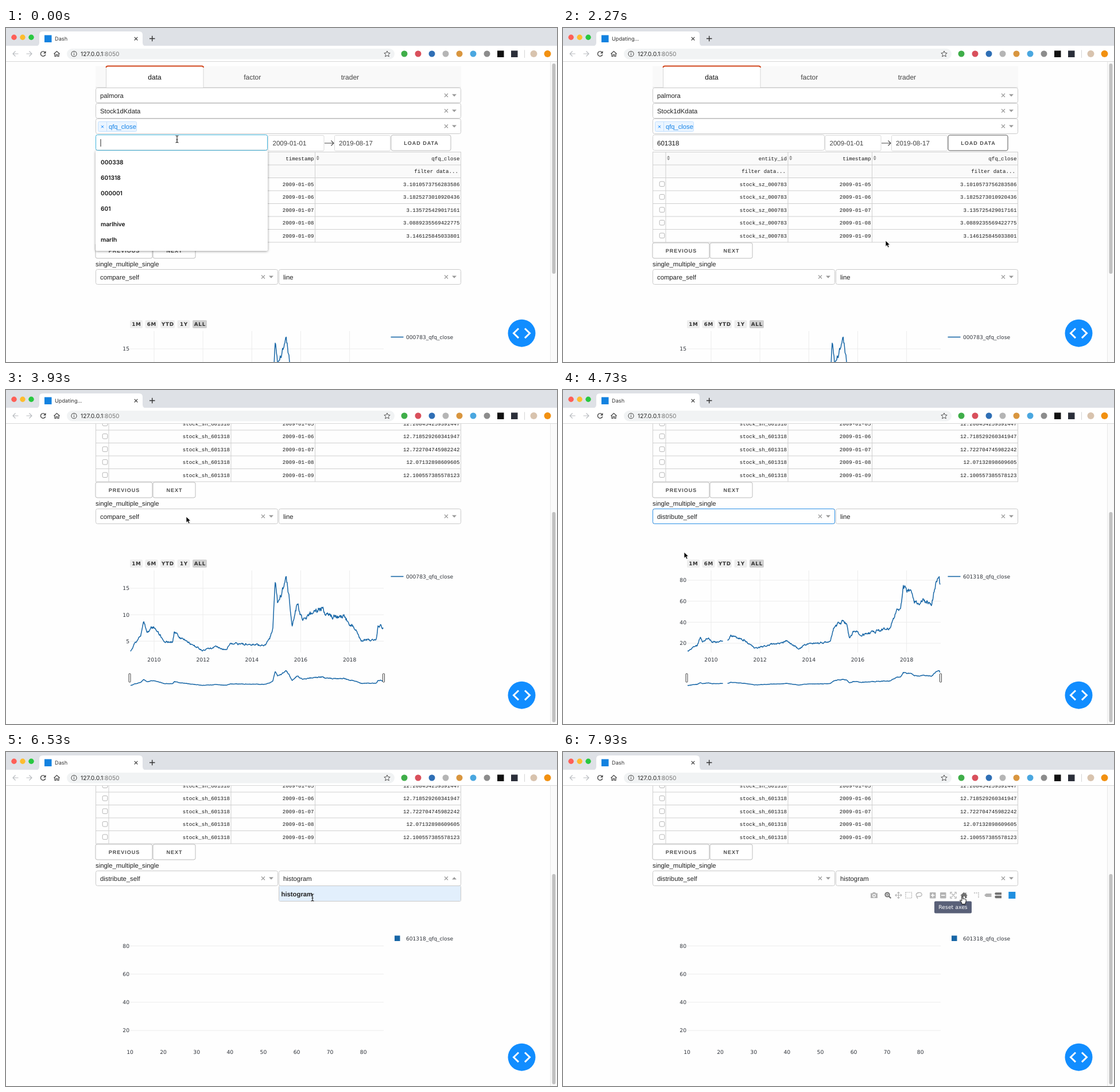
Write an HTML page that moves like this. It is 960 by 583 pixels and loops after 8000 ms.

```html
<!DOCTYPE html>
<html lang="en">
<head>
<meta charset="utf-8">
<title>Data dashboard</title>
<style>
html, body { margin: 0; width: 100%; height: 100%; overflow: hidden; background: #fff }
svg { display: block; width: 960px; height: 583px; text-rendering: geometricPrecision }
text { white-space: pre }
</style>
</head>
<body>
<svg id="stage" viewBox="0 0 960 583"></svg>
<script>
const LOOP = 8000, SCROLL = 214;
const SANS = '"Liberation Sans", Arial, sans-serif';
const MONO = '"Liberation Mono", monospace';
const PLOT = '"DejaVu Sans", Verdana, sans-serif';
const UI = 'Inter, sans-serif';
const BLUE = '#1766a6', GREY = '#b3b3b3', DARK = '#707070', BORDER = '#c9c9c9', GRID = '#ececec';
const timed = [];

// Drawing helpers
function el(parent, tag, attrs = {}, content) {
  const node = document.createElementNS('http://www.w3.org/2000/svg', tag);
  for (const k in attrs) node.setAttribute(k, attrs[k]);
  if (content !== undefined) node.textContent = content;
  return parent.appendChild(node);
}
const group = (p, attrs) => el(p, 'g', attrs);
const rect = (p, x, y, width, height, fill, attrs) => el(p, 'rect', { x, y, width, height, fill, ...attrs });
const box = (p, x, y, w, h, stroke, fill = '#fff', rx = 3) => rect(p, x, y, w, h, fill, { stroke, rx });
const line = (p, d, stroke, width = 1, attrs) =>
  el(p, 'path', { d, stroke, fill: 'none', 'stroke-width': width, ...attrs });
const shape = (p, d, fill, attrs) => el(p, 'path', { d, fill, ...attrs });
const dot = (p, cx, cy, r, fill, attrs) => el(p, 'circle', { cx, cy, r, fill, ...attrs });
// y is the middle of the capitals
const text = (p, x, y, s, size = 11.3, fill = '#222', attrs) =>
  el(p, 'text', { x, y: y + size * .36, 'font-family': SANS, 'font-size': size, fill, ...attrs }, s);
const cross = (p, x, y, r, stroke, w) =>
  line(p, `M${x - r} ${y - r}l${2 * r} ${2 * r}m0 ${-2 * r}l${-2 * r} ${2 * r}`, stroke, w);

// Shows a node only within the given [from, to] spans
function when(node, ...spans) {
  timed.push({ node, spans });
  return node;
}

// Moves smoothly through [time, value, ...] keys
function track(keys, t) {
  let a = keys[0];
  for (const b of keys) {
    if (t < b[0]) {
      const u = (t - a[0]) / (b[0] - a[0]), e = u * u * (3 - 2 * u);
      return a.slice(1).map((v, i) => v + (b[i + 1] - v) * e);
    }
    a = b;
  }
  return a.slice(1);
}

const svg = document.getElementById('stage');
rect(svg, 0, 0, 960, 583, '#fefefe');
const page = group(svg);

// Tabs
rect(page, 156, 66.5, 637, 37.5, '#f9f9f9');
line(page, 'M156 103.5H792.5', '#e3e3e3');
rect(page, 174, 66, 170, 38, '#fff');
line(page, 'M174.5 104V69q0-3 3-3H341q3 0 3 3V104', '#d6d6d6');
line(page, 'M174.5 69q0-2.5 3-2.5H341q3 0 3 2.5', '#d4491f', 2);
['data', 'factor', 'trader'].forEach((s, i) =>
  text(page, 259 + i * 170.2, 86, s, 12, i ? '#444' : '#111', { 'text-anchor': 'middle' }));

// Select boxes
function select(x, y, w) {
  box(page, x + .5, y + .5, w - 1, 26, BORDER);
  cross(page, x + w - 26, y + 13.5, 3, '#999', 1.1);
  shape(page, `M${x + w - 16} ${y + 11.5}h8l-4 4.2z`, '#999');
  return { x, y, w };
}
const focusRing = (s, span) => when(box(page, s.x + .5, s.y + .5, s.w - 1, 26, '#2a8fe6', 'none'), span);
const selected = (s, label, span) => when(text(page, s.x + 8, s.y + 13.5, label), span);
const always = [0, LOOP];
const [source, kind] = [104, 131, 158].map(y => select(156, y, 637));
selected(source, 'palmora', always);
selected(kind, 'Stock1dKdata', always);
box(page, 160.5, 163.5, 67, 17, '#c2e0ff', '#ebf5ff', 2);
line(page, 'M175.5 163V181', '#c2e0ff');
cross(page, 168, 172.3, 2, '#007eff', 1);
text(page, 179, 172, 'qfq_close', 11.2, '#1583e8');

// Code input, dates, load button
box(page, 156.5, 186.5, 299, 27, '#d1d1d1');
when(box(page, 156.5, 186.5, 299, 27, '#3fb4dd'), [0, 1600]);
when(line(page, 'M165 194V207', '#222'), [0, 600]);
when(text(page, 164, 200.5, '601318', 11.5, '#111'), [600, LOOP]);
['2009-01-01', '2019-08-17'].forEach((s, i) => {
  const x = 457 + i * 115.5;
  box(page, x, 187.5, 97, 27, '#dbdbdb', '#fff', 2);
  text(page, x + 7.5, 201, s, 11.5, '#444');
});
line(page, 'M555 201H571M566.5 196.5l4.5 4.5-4.5 4.5', '#484848', 1.1);
function button(x, y, w, s) {
  box(page, x + .5, y + .5, w - 1, 27, '#bbb');
  text(page, x + w / 2 + .5, y + 14, s, 9, '#4c4c4c',
    { 'font-weight': 700, 'letter-spacing': 1, 'text-anchor': 'middle' });
}
button(670.5, 186.5, 105, 'LOAD DATA');
when(box(page, 671, 187, 104, 27, '#777', 'none'), [1450, LOOP]);

// Table
const columns = [156.5, 179, 392, 538.5, 792.5];
const mono = (p, x, y, s) => text(p, x, y, s, 9.13, '#1a1a1a', { 'font-family': MONO, 'text-anchor': 'end' });
rect(page, 156, 216.5, 636, 45, '#fafafa');
for (let i = 0; i < 8; i++) line(page, `M156 ${216.5 + i * 22.5}H793`, '#cfcfcf');
columns.forEach(x => line(page, `M${x} 216V374`, '#cfcfcf'));
['entity_id', 'timestamp', 'qfq_close'].forEach((s, i) => {
  mono(page, columns[i + 2] - 2, 227.5, s);
  shape(page, `M${columns[i + 1] + 2} 226.2h5.4l-2.7-3.4zm0 1.4h5.4l-2.7 3.4z`, '#999');
});
[388, 788].forEach(x => mono(page, x, 250, 'filter data...'));
function tableRows(code, values, span) {
  const g = when(group(page), span);
  values.forEach((v, i) => {
    const y = 272.5 + i * 22.5;
    box(g, 168.2, y - 4.5, 8.6, 8.6, '#b5b5b5', '#fff', 2);
    mono(g, 390, y, code);
    mono(g, 536.5, y, '2009-01-0' + (i + 5));
    mono(g, 790.5, y, v);
  });
}
tableRows('stock_sz_000783', ['3.1010573756283586', '3.1825273010920436', '3.135725429017161',
  '3.0889235569422775', '3.146125845033801'], [0, 2400]);
tableRows('stock_sh_601318', ['12.208454259391447', '12.718529260341947', '12.722704745982242',
  '12.07132898609605', '12.100557385578123'], [2400, LOOP]);
button(155.5, 374.5, 100, 'PREVIOUS');
button(255.5, 374.5, 75, 'NEXT');
text(page, 156, 412, 'single_multiple_single');

// Chart controls
const mode = select(156, 421, 318), style = select(475, 421, 318);
focusRing(mode, [4670, 5850]);
focusRing(style, [6830, 7300]);
selected(mode, 'compare_self', [0, 4730]);
selected(mode, 'distribute_self', [4730, LOOP]);
selected(style, 'line', [0, 5070]);
selected(style, 'histogram', [5070, LOOP]);

// Price curves: a few x, y turning points with seeded jitter that grows with the price
const firstKnots = [217,457, 224,443, 236,425, 240,402, 245,423, 258,411, 274,438, 290,440, 293,423,
  308,435, 343,455, 366,448, 384,454, 390,442, 452,446, 461,430, 465,417, 469,331, 473,372, 479,360,
  487,324, 494,370, 499,412, 508,371, 517,405, 535,386, 550,381, 562,396, 588,396, 611,421, 619,437,
  645,436, 648,412, 657,413];
const secondKnots = [217,456, 234,446, 239,431, 243,441, 252,432, 262,440, 286,439, 292,428, 316,437,
  334,451, 368,443, 390,438, 411,452, 424,444, 466,440, 472,415, 488,403, 494,408, 499,433, 508,419,
  518,428, 570,415, 582,384, 588,388, 593,346, 604,350, 613,369, 642,370, 655,323, 657,339];
function curve(knots, seed, rough, gap = [0, 0]) {
  const random = () => (seed = seed * 16807 % 2147483647) / 2147483647;
  const out = { main: '', small: '' };
  let k = 0, noise = 0, pen = 'M';
  for (let x = knots[0]; x <= 657; x += .8) {
    while (x > knots[k + 2]) k += 2;
    const u = (x - knots[k]) / (knots[k + 2] - knots[k]);
    const base = knots[k + 1] + (knots[k + 3] - knots[k + 1]) * u;
    noise = noise * .6 + (random() - .5) * (1.6 + (458 - base) * rough);
    if (x > gap[0] && x < gap[1]) { pen = 'M'; continue; }
    const y = Math.min(457.5, Math.max(321, base + noise));
    out.main += `${pen}${x.toFixed(1)} ${y.toFixed(1)}`;
    out.small += `${pen}${x.toFixed(1)} ${(516 - (457 - y) * .2).toFixed(1)}`;
    pen = 'L';
  }
  return out;
}

const plots = group(page, { transform: `translate(0 ${SCROLL})` });
const plotText = (p, x, y, s, size, anchor, fill = '#2f333a') =>
  text(p, x, y, s, size, fill, { 'font-family': PLOT, 'text-anchor': anchor });
const tick = (p, x, y, s, anchor = 'middle') => plotText(p, x, y, s, 9.2, anchor);
// Horizontal grid lines from the first label's y, one per step
function yAxis(p, labels, y0, step) {
  labels.forEach((s, i) => {
    const y = y0 + i * step;
    line(p, `M216 ${y}H658`, GRID);
    tick(p, 215, y, s, 'end');
  });
}

function lineChart(name, labels, y0, step, data, span) {
  const g = when(group(plots), span);
  for (let i = 0; i < 5; i++) {
    const x = 258 + i * 85.15;
    line(g, `M${x} 315V458`, GRID);
    tick(g, x, 471, 2010 + i * 2);
  }
  yAxis(g, labels, y0, step);
  let x = 216;
  ['1M', '6M', 'YTD', '1Y', 'ALL'].forEach(s => {
    const w = s.length > 2 ? 25 : 22;
    rect(g, x, 296, w, 14, s === 'ALL' ? '#d0d0d0' : '#eee', { rx: 2 });
    text(g, x + w / 2 + .4, 303, s, 8.8, '#333',
      { 'font-family': PLOT, 'font-weight': 700, 'letter-spacing': .7, 'text-anchor': 'middle' });
    x += w + 4.5;
  });
  line(g, data.main, BLUE, 1.5, { 'stroke-linejoin': 'round' });
  line(g, data.small, BLUE, 1.5, { 'stroke-linejoin': 'round' });
  [215.5, 658].forEach(x => box(g, x - 1.5, 495, 3, 15, '#444', '#fff', 1));
  line(g, 'M670.5 325.5H692.5', BLUE, 1.6);
  plotText(g, 697, 325.5, name, 9.1);
}
lineChart('000783_qfq_close', [15, 10, 5], 346, 46.2, curve(firstKnots, 71, .09), [0, 4330]);
lineChart('601318_qfq_close', [80, 60, 40, 20], 332, 36.7,
  curve(secondKnots, 29, .065, [279, 286]), [4330, 6300]);

const histogram = when(group(plots), [6300, LOOP]);
yAxis(histogram, [80, 60, 40, 20], 338.5, 49.2);
for (let i = 0; i < 8; i++) tick(histogram, 216 + i * 58.1, 523.5, 10 + i * 10);
rect(histogram, 677, 320.5, 9.5, 9.5, BLUE);
plotText(histogram, 697, 325.5, '601318_qfq_close', 9.1);

// Plot toolbar
const bar = group(plots);
function dragTools(shift, span) {
  const g = when(group(bar, { transform: `translate(${shift} 250)` }), span);
  shape(g, 'M572-3.5h3l1.3-1.7h3.4l1.3 1.7h3V5H572z', GREY);
  dot(g, 578, .7, 2.3, GREY, { stroke: '#fff', 'stroke-width': 1.3 });
  dot(g, 601, -1, 3.6, 'none', { stroke: DARK, 'stroke-width': 2 });
  line(g, 'M599-1H603M601-3V1', DARK);
  line(g, 'M603.7 1.7l3.6 3.6', DARK, 2.2);
  line(g, 'M615 0H626M620.5-5.5V5.5M617-2l-2 2 2 2m7-4 2 2-2 2m-5.5-5.5 2-2 2 2m-4 7 2 2 2-2', GREY, 1.1);
  return g;
}
dragTools(0, [0, 6300]);
const extra = dragTools(-36, [6300, LOOP]);
rect(extra, 633, -5, 10.5, 10, 'none', { stroke: GREY, 'stroke-width': 1.2, 'stroke-dasharray': '2 1' });
line(extra, 'M653 3c-3-3-2-7 3-7.5 6-.5 7 6 2 6.5-3 .3-5-.5-5.5 1s2 1 1 3', GREY, 1.3);
[639, 657].forEach(x => {
  rect(bar, x, 245, 10.5, 10.5, GREY, { rx: 1 });
  line(bar, `M${x + 2} 250.2h6.5`, '#fff', 1.6);
});
line(bar, 'M644.2 247V253.5', '#fff', 1.6);
line(bar, 'M675 248v-3h3m4 0h3v3m0 4v3h-3m-4 0h-3v-3M677 247l6 6m0-6-6 6', GREY, 1.4);
const home = shape(bar, 'M692 250.5l6.5-5.7 2.5 2.2v-1.5h1.5v2.8l2.5 2.2h-1.5v4.5H700v-3h-2.5v3H694v-4.5z', GREY);
line(bar, 'M716 246H724V255', GREY, 1.6, { 'stroke-dasharray': '2 1.5' });
shape(bar, 'M734 250l3-3h9.5v6H737z', GREY);
shape(bar, 'M752 247.2l1.5-2H764v4H753.5zm0 5.5 1.5-2H764v4.5H753.5z', DARK);
rect(bar, 776.3, 244, 12, 12, '#1f8fe0');
const tip = when(group(plots), [7870, LOOP]);
rect(tip, 647, 260.5, 65, 21, '#596078', { rx: 2 });
plotText(tip, 679.5, 271, 'Reset axes', 9.3, 'middle', '#fff');

// Open select menu: options are [label, span when highlighted]
function menu(s, options, span) {
  const g = when(group(page), span), top = s.y + 27;
  box(g, s.x + .5, top - .5, s.w - 1, options.length * 27, BORDER, '#fff', 2);
  options.forEach(([label, lit], i) => {
    const y = top + i * 27;
    when(rect(g, s.x + 1, y, s.w - 2, 26, '#e2effc'), lit);
    text(g, s.x + 4.5, y + 13.5, label, 11.3, '#222', { 'font-weight': i ? 400 : 700 });
  });
  rect(g, s.x + s.w - 17, s.y + 10, 10, 7, '#fff');
  shape(g, `M${s.x + s.w - 16} ${s.y + 15.5}h8l-4-4.2z`, '#999');
}
menu(mode, [['compare_self', [4000, 4450]], ['distribute_self', [4450, 4670]]], [4000, 4670]);
menu(style, [['histogram', [5900, 6830]]], [5900, 6830]);

// Autofill list
const popup = when(group(page), [0, 800]);
rect(popup, 156, 214, 300, 175, '#fff', { rx: 2, style: 'filter:drop-shadow(0 1px 2px #0006)' });
when(rect(popup, 156, 248, 300, 27, '#e8e8e9'), [450, 800]);
['000338', '601318', '000001', '601', 'marlhive', 'marlh'].forEach((s, i) =>
  text(popup, 165, 234.5 + i * 27, s, 10.2, '#111', { 'font-family': UI, 'font-weight': 600 }));

// Scrollbar and debug button
rect(svg, 949, 59, 11, 524, '#fafafa');
line(svg, 'M948.5 59V583', '#e8e8e8');
const thumb = rect(svg, 951.5, 62, 6, 367, '#c1c1c1', { rx: 3 });
dot(svg, 898.5, 532.7, 24, '#118dff');
line(svg, 'M893 524.5l-8.5 8.3 8.5 8.3M904 524.5l8.5 8.3-8.5 8.3', '#fff', 3);

// Browser frame
rect(svg, 0, 0, 960, 32, '#dee1e6');
rect(svg, 0, 31, 960, 28, '#fff');
line(svg, 'M0 58.5H960', '#d8d8d8');
shape(svg, 'M52 31.5q6 0 6-6V12q0-6 6-6H232q6 0 6 6V25.5q0 6 6 6z', '#fff');
['#ff5f57', '#febc2e', '#28c840'].forEach((c, i) => dot(svg, 14 + i * 15, 16.3, 4.7, c));
rect(svg, 67, 12.5, 12.5, 12.5, '#1382e0');
const title = (s, ...spans) =>
  when(text(svg, 85, 18.5, s, 9.2, '#333', { 'font-family': UI }), ...spans);
title('Dash', [0, 1730], [4330, 4930], [6400, 6870], [7670, LOOP]);
title('Updating...', [1730, 4330], [4930, 6400], [6870, 7670]);
cross(svg, 226.5, 18.7, 2.8, '#444', 1.2);
line(svg, 'M250 18.5H259.5M254.7 13.7V23.3', '#333', 1.4);
line(svg, 'M21.5 45H12M16.5 40.5 12 45l4.5 4.5M35.5 45H45M40.5 40.5 45 45l-4.5 4.5', '#b9bcc0', 1.2);
line(svg, 'M68 42.5a4.2 4.2 0 1 0 .7 3.7', '#444', 1.4);
shape(svg, 'M69.5 40v4.5H65z', '#444');
line(svg, 'M83.5 45.3 88.5 40.5l5 4.8M85 44.5V49.5h2.3v-3h2.4v3H92V44.5', '#444', 1.2);
rect(svg, 106, 36, 571, 18.5, '#f1f3f4', { rx: 9.2 });
dot(svg, 118.5, 45.2, 4.6, 'none', { stroke: '#555', 'stroke-width': 1.1 });
line(svg, 'M118.5 44.5V47.7M118.5 42.5V43.7', '#555', 1.1);
const address = text(svg, 130, 45, '127.0.0.1', 10.3, '#222', { 'font-family': UI });
el(address, 'tspan', { fill: '#777' }, ':8050');
line(svg, 'M664 40l1.5 3.5 3.7.3-2.8 2.5.9 3.7-3.3-2-3.3 2 .9-3.7-2.8-2.5 3.7-.3z', '#555');
['#3fae49', '#d9505c', '#2f6fb5', '#b5b5b5', '#d9963f', '#4aa7e0', '#8c8c8c'].forEach((c, i) =>
  dot(svg, 694 + i * 24, 45, 5.5, c));
['#111', '#2b2f3a'].forEach((c, i) => rect(svg, 856 + i * 24, 39.5, 11.5, 11.5, c));
line(svg, 'M903.5 38.5V52', '#d5d5d5');
['#d8c3ae', '#f29111'].forEach((c, i) => dot(svg, 919.5 + i * 24, 45, 6, c));

// Pointer
const pointer = group(svg);
const arrow = shape(pointer, 'M0 0V10.5L2.5 8.3 4.2 12.2 6.2 11.3 4.5 7.6H7.8z', '#000',
  { stroke: '#fff', 'stroke-width': .8 });
const beam = line(pointer, 'M-2.5-6q2.5 0 2.5 1.5V4.5q0 1.5-2.5 1.5M2.5-6Q0-6 0-4.5V4.5Q0 6 2.5 6M-1.5 1H1.5', '#222', 1.1);
const hand = shape(pointer, 'M-2.5 7L-5.5 3q.3-1.500 2 0L-2.200 4V-3.500q1.200-1.500 2 0V.5q1.300-1 2 0 1.200-.6 1.900.4 1.300-.3 1.500 1V5L4 8V9.500H-2z',
  '#fff', { stroke: '#111' });
when(beam, [0, 300], [6300, 6800]);
when(hand, [1450, 1850], [7850, LOOP]);
when(arrow, [300, 1450], [1850, 6300], [6800, 7850]);
const path = [[70, 298, 194], [640, 205, 262], [870, 205, 262], [1530, 722, 203], [1730, 722, 203],
  [2270, 562, 371], [2530, 470, 455], [3130, 470, 455], [3800, 314, 221], [4000, 314, 221], [4600, 211, 283],
  [4930, 211, 283], [5650, 659, 221], [5900, 659, 221], [6500, 534, 254], [6800, 534, 254],
  [7300, 640, 420], [7640, 786, 312], [7900, 697, 256]];
const scrolling = [[2980, 0], [3120, 1]];
const barFade = [[2590, 0], [2800, 1], [3600, 1], [3850, 0], [5000, 0], [5200, 1], [5600, 1],
  [5850, 0], [6900, 0], [7100, 1]];

function frame(now) {
  const t = now % LOOP;
  for (const { node, spans } of timed)
    node.style.display = spans.some(([a, b]) => t >= a && t < b) ? '' : 'none';
  const [s] = track([[0, 0], ...scrolling], t);
  page.setAttribute('transform', `translate(0 ${-SCROLL * s})`);
  thumb.setAttribute('y', 62 + 151 * s);
  bar.setAttribute('opacity', track([[0, 0], ...barFade], t)[0]);
  home.setAttribute('fill', t >= 7850 ? DARK : GREY);
  pointer.setAttribute('transform', `translate(${track([[0, 298, 194], ...path], t)})`);
  requestAnimationFrame(frame);
}
frame(0);
</script>
</body>
</html>
```
